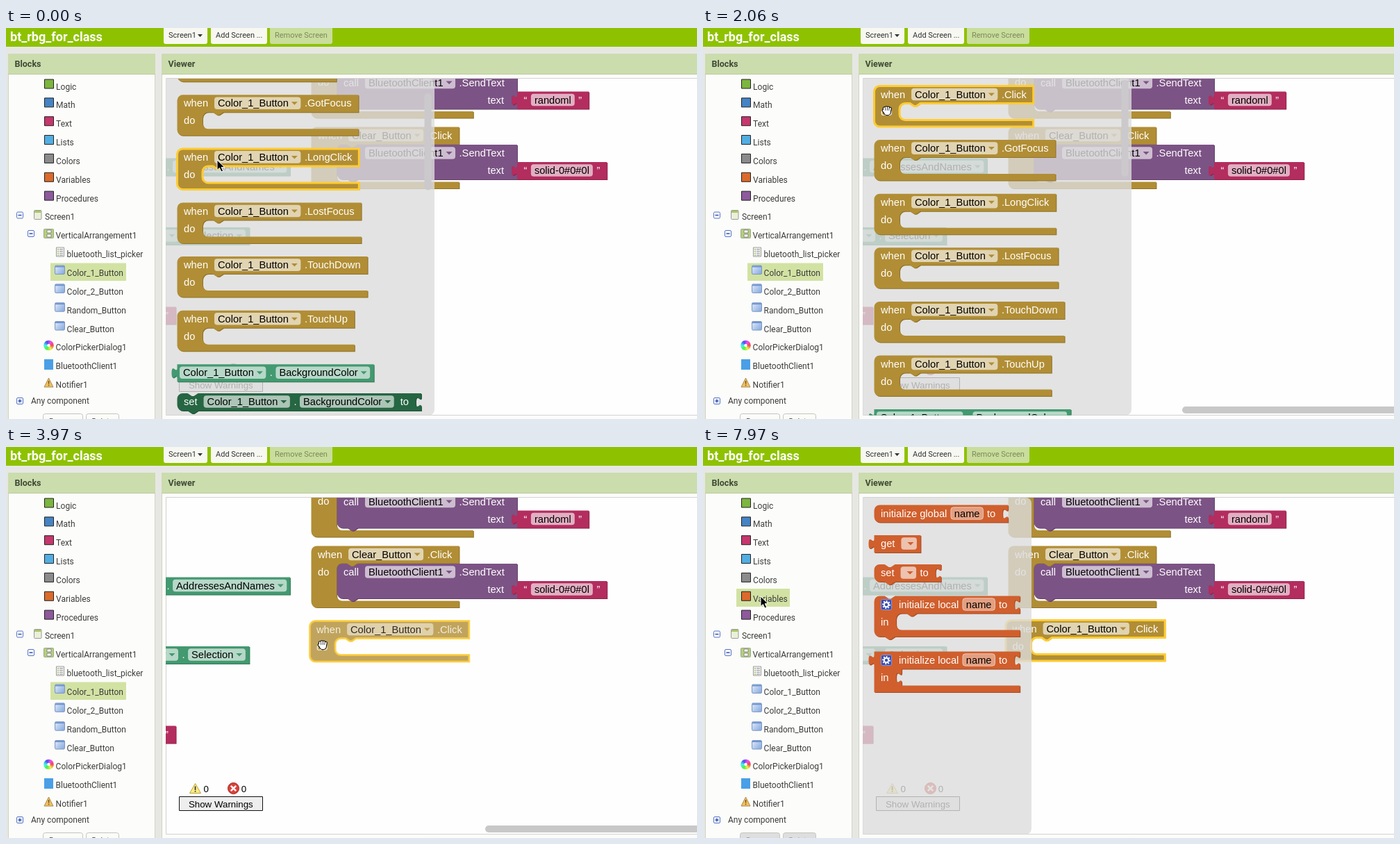
Recreate the animation shown at these times as an HTML page with a canvas. Size 995x563 px, loop 8 s.

```html
<!DOCTYPE html>
<html lang="en">
<head>
<meta charset="utf-8">
<title>Block editor</title>
<style>
html, body { margin: 0; width: 100%; height: 100%; overflow: hidden; background: #e6e7e3; }
canvas { display: block; }
</style>
</head>
<body>
<canvas id="stage" width="995" height="563"></canvas>
<script>
const g = document.getElementById('stage').getContext('2d');
const LOOP = 8000, STEP = 147.5;
const SANS = '"Liberation Sans", Arial, sans-serif', UI = 'Roboto, sans-serif';
const BLOCK_FONT = '14.667px ' + SANS;
const GOLD = '#b18e35', PURPLE = '#7c5385', PINK = '#b32d5e', GREEN = '#439970',
      DARK_GREEN = '#266643', ORANGE = '#d05f2d';
const NOTCH = 'l6 4 3 0 6 -4', NOTCH_BACK = 'l-6 4 -3 0 -6 -4';
const TAB = 'c0 10 -8 -8 -8 7.5 s8 -2.5 8 7.5', TAB_UP = 'c0 -10 -8 8 -8 -7.5 s8 2.5 8 -7.5';

// Motion keys: [step, x, y], linear between them.
const CURSOR = [[0, 304, 190], [4, 279, 139], [10, 279, 139], [14, 265, 119], [16, 265, 119],
  [17, 290, 128], [20, 399, 169], [22, 500, 245], [23, 546, 296], [24, 524, 322], [25, 497, 310],
  [27, 456, 285], [29, 455, 284], [30, 446, 283], [32, 389, 280], [33, 272, 291], [34, 172, 299],
  [35, 172, 299], [36, 161, 325], [38, 140, 385], [39, 134, 376], [41, 131, 342], [42, 134, 315],
  [43, 134, 315], [44, 129, 296], [46, 108, 218], [48, 88, 169], [51, 83, 213], [52, 83, 215]];
const DRAG = [[16, 246.5, 83.5], [17, 264, 90], [20, 352.5, 121.5], [22, 470, 205], [23, 527, 262],
  [24, 505, 288], [25, 475, 274], [27, 437.5, 250.5], [28, 437, 250.5], [29, 436, 249.5]];
const SCROLL = [[5, 64.8, 0], [6, 44, 0], [7, 14, 0], [8, 0, 0]];

function at(keys, k) {
  const i = keys.findIndex(p => p[0] >= k);
  if (i === 0) return keys[0].slice(1);
  if (i < 0) return keys[keys.length - 1].slice(1);
  const a = keys[i - 1], b = keys[i], u = (k - a[0]) / (b[0] - a[0]);
  return [a[1] + (b[1] - a[1]) * u, a[2] + (b[2] - a[2]) * u];
}

function text(s, x, y, font, color, align = 'left') {
  g.font = font;
  g.fillStyle = color;
  g.textAlign = align;
  g.fillText(s, x, y);
}

function box(x, y, w, h, r, fill, stroke) {
  g.beginPath();
  g.roundRect(x, y, w, h, r);
  if (fill) { g.fillStyle = fill; g.fill(); }
  if (stroke) { g.strokeStyle = stroke; g.lineWidth = 1; g.stroke(); }
}

function poly(points, fill, stroke, width = 1) {
  g.beginPath();
  points.forEach(p => g.lineTo(...p));
  g.closePath();
  g.fillStyle = fill;
  g.fill();
  if (stroke) { g.strokeStyle = stroke; g.lineWidth = width; g.stroke(); }
}

function measure(s) {
  g.font = BLOCK_FONT;
  return g.measureText(s).width;
}

function gear(x, y) {
  box(x, y, 15, 15, 2, '#3c4fb0', '#8a96dc');
  g.strokeStyle = '#fff';
  g.lineWidth = 2;
  g.beginPath();
  g.arc(x + 7.5, y + 7.5, 3.2, 0, 7);
  g.stroke();
  g.setLineDash([1.8, 1.97]);
  g.beginPath();
  g.arc(x + 7.5, y + 7.5, 5, 0, 7);
  g.stroke();
  g.setLineDash([]);
}

// Items: string = label, number = extra gap, [text, dropdown] = field, null = gear. Returns the width.
function row(items, x, y, color, draw) {
  let cx = x + 9.5, end = 0;
  for (const it of items) {
    if (typeof it === 'number') { cx += it; continue; }
    if (it === null) {
      if (draw) gear(cx + .5, y + 5);
      cx += 26;
    } else if (typeof it === 'string') {
      if (draw) text(it, cx, y + 17, BLOCK_FONT, '#fff');
      cx += measure(it) + 5.5;
      end = 4.5;
    } else {
      const [s, drop] = it, w = measure(s) + (drop ? 22.5 : 10);
      if (draw) {
        const soft = !drop && color === ORANGE;
        box(cx, y + 3.2, w, 17.6, 4, soft ? 'rgba(255,255,255,.4)' : 'rgba(255,255,255,.62)',
          soft && 'rgba(255,255,255,.5)');
        text(s, cx + 5, y + 17, BLOCK_FONT, '#000');
        const r = cx + w - 4.5;
        if (drop) poly([[r - 9, y + 10], [r, y + 10], [r - 4.5, y + 14.5]], color);
      }
      cx += w + 5.5;
      end = 0;
    }
  }
  return cx + end - x;
}

function block(o) {
  const { x, y, color, items } = o, h = o.h || 25;
  const w = o.w || row(items, x, y, color) + (o.socket !== undefined ? 8 : 0);
  const m = o.label && x + 20.2 + measure(o.label), mh = o.mouth || 24;
  const right = x + w;
  let bottom = y + h, d = o.out ? `M${x} ${y}` : `M${x} ${y + 8}a8 8 0 0 1 8 -8`;
  if (o.prev) d += `H${x + 15}${NOTCH}`;
  d += `H${right}`;
  if (o.socket !== undefined) d += `V${y + 5 + 25 * o.socket}${TAB}`;
  d += `V${bottom}`;
  if (o.label) {
    d += o.value ? `H${m + 8}v5${TAB}V${bottom + mh}`
      : `H${m + 30}${NOTCH_BACK}h-7a8 8 0 0 0 -8 8v${mh - 16}a8 8 0 0 0 8 8`;
    bottom += mh + 9.5;
    d += `H${right}V${bottom}`;
  }
  if (o.next) d += `H${x + 30}${NOTCH_BACK}`;
  d += o.out ? `H${x}V${y + 20}${TAB_UP}z` : `H${x + 8}a8 8 0 0 1 -8 -8z`;
  const path = new Path2D(d);
  g.save();
  if (o.dragging) g.globalAlpha = .8;
  else {
    g.translate(1, 1);
    g.fillStyle = color;
    g.fill(path);
    g.fillStyle = 'rgba(0,0,0,.2)';
    g.fill(path);
    g.translate(-1, -1);
  }
  g.fillStyle = color;
  g.fill(path);
  if (o.selected) {
    g.strokeStyle = '#fc3';
    g.lineWidth = 3;
    g.stroke(path);
  }
  row(items, x, y, color, true);
  if (o.label) text(o.label, x + 9.5, y + 42, BLOCK_FONT, '#fff');
  g.restore();
}

function eventBlock(x, y, name, event, more) {
  block({ x, y, color: GOLD, items: ['when', 3.5, [name, 1], '.' + event], label: 'do', ...more });
}

function sendText(x, y, name, value) {
  eventBlock(x, y, name, 'Click', { mouth: 54 });
  block({ x: x + 37, y: y + 25.5, color: PURPLE, w: 259.5, h: 50, prev: 1, next: 1, socket: 1,
    items: ['call', 3.5, ['BluetoothClient1', 1], '.SendText'] });
  text('text', x + 277.5, y + 67.5, BLOCK_FONT, '#fff', 'right');
  block({ x: x + 296.5, y: y + 50.5, color: PINK, out: 1, items: ['“', [value], '”'] });
}

function workspace(k) {
  sendText(439.5, 41, 'Random_Button', 'randoml');
  sendText(439.5, 142.5, 'Clear_Button', 'solid-0#0#0l');
  const picker = 'bluetooth_list_picker', start = 227 - measure(picker);
  block({ x: start - 149, y: 187.5, color: GREEN, out: 1, w: 558 - start,
    items: [-6, [picker, 1], '.'] });
  row([-1, '.', -1, ['AddressesAndNames', 1]], 223, 187.5, GREEN, true);
  block({ x: start - 5, y: 287, color: GREEN, out: 1,
    items: [-6, [picker, 1], '.', -1, ['Selection', 1]] });
  block({ x: 180, y: 401.5, color: PINK, out: 1, w: 64.5, items: [39.5, '”'] });

  poly([[272.5, 484.5], [280.5, 498.5], [264.5, 498.5]], '#ffec80', '#b9a23c');
  g.fillStyle = '#333';
  g.fillRect(271.7, 488.5, 1.7, 5.5);
  g.fillRect(271.7, 495, 1.7, 1.7);
  text('0', 284.5, 497, '13.33px ' + SANS, '#000');
  g.beginPath();
  g.arc(327.5, 491.5, 8, 0, 7);
  g.fillStyle = '#d8423a';
  g.fill();
  g.strokeStyle = '#a52a24';
  g.lineWidth = 1;
  g.stroke();
  g.strokeStyle = '#fff';
  g.lineWidth = 2.4;
  g.beginPath();
  for (const s of [-1, 1]) { g.moveTo(323.8, 491.5 - 3.7 * s); g.lineTo(331.2, 491.5 + 3.7 * s); }
  g.stroke();
  text('0', 338.8, 497, '13.33px ' + SANS, '#000');
  box(249.5, 503.5, 120, 20, 0, '#eee', '#111');
  text('Show Warnings', 309.3, 518.5, '13.33px ' + SANS, '#000', 'center');

  if (k >= 17) {
    const [x, y] = at(DRAG, k);
    eventBlock(x, y, 'Color_1_Button', 'Click', { selected: 1, dragging: k < 29 });
  }
  if (k >= 14 && k < 52) box(690, 545, 320, 10, 5, '#c8c8c8');
}

function flyout(width) {
  box(222, 73, width + 8, 484.5, 8, 'rgba(221,221,221,.8)');
}

function buttonFlyout(k) {
  const scroll = at(SCROLL, k)[0], top = 83.5 - scroll, x = 246.5, name = ['Color_1_Button', 1];
  const hot = k < 3 ? 2 : k < 11 ? 1 : 0;
  flyout(387);
  ['Click', 'GotFocus', 'LongClick', 'LostFocus', 'TouchDown', 'TouchUp'].forEach((e, i) =>
    eventBlock(x, top + 77.6 * i, name[0], e, { selected: i === hot }));
  block({ x, y: top + 465.6, color: GREEN, out: 1,
    items: [-6, name, '.', -1, ['BackgroundColor', 1]] });
  block({ x, y: top + 507.3, color: DARK_GREEN, prev: 1, next: 1, socket: 0,
    items: ['set', 3.5, name, '.', -1, ['BackgroundColor', 1], 3.5, 'to'] });
  box(602.5, 75 + scroll * .3, 10, 139, 5, '#cbc9cc');
}

function variableFlyout() {
  const add = (y, items, more) => block({ x: 246.5, y, color: ORANGE, items, ...more });
  const local = [null, 'initialize local', ['name'], 'to'];
  flyout(243);
  add(83.5, ['initialize global', ['name'], 'to'], { socket: 0 });
  add(127, ['get', 3.5, ['', 1]], { out: 1 });
  add(169, ['set', 3.5, ['', 1], 'to'], { prev: 1, next: 1, socket: 0 });
  add(214.5, local, { prev: 1, next: 1, socket: 0, label: 'in' });
  add(294.5, local, { out: 1, socket: 0, label: 'in', value: 1 });
}

function toggle(x, y, plus) {
  box(x + .5, y - 4.5, 9, 9, 1.5, '#fff', '#5573c4');
  g.fillStyle = '#2f4fb0';
  g.fillRect(x + 2.5, y - .7, 5, 1.5);
  if (plus) g.fillRect(x + 4.2, y - 2.5, 1.5, 5);
}

function sidebar(k) {
  const label = (s, x, i) => text(s, x + .6, 88.5 + 26.85 * i, '12px ' + UI, '#3c3c3c');
  const variables = k >= 52;
  g.fillStyle = '#d2e2a3';
  if (variables) g.fillRect(48, 204, 77, 26);
  else g.fillRect(64, 338.5, 109, 25.5);

  [['Logic', '#7cb53f'], ['Math', '#4583c4'], ['Text', '#c5376d'], ['Lists', '#52aee2'],
   ['Colors', '#8b8b8b'], ['Variables', '#db6a2c'], ['Procedures', '#8d5a9b']].forEach(([s, c], i) => {
    box(55.5, 74 + 26.85 * i, 13, 13, 0, c, '#222');
    label(s, 71.5, i);
  });

  toggle(15, 269.5);
  box(40.5, 262.5, 10.5, 13, 1, '#e9efd9', '#999');
  g.fillStyle = '#a9c66a';
  g.fillRect(41, 263, 9.5, 3);
  label('Screen1', 55.3, 7);
  toggle(31, 296);
  box(54.5, 289.5, 14, 13, 1, '#b5d07a', '#9aa98a');
  box(59, 291, 6, 4, 0, '#fff', '#888');
  box(59, 297, 6, 4, 0, '#fff', '#888');
  label('VerticalArrangement1', 71, 8);
  box(72.5, 316, 11, 13, 0, '#fafafa', '#999');
  for (let i = 0; i < 4; i++) {
    g.fillStyle = '#8fae5c';
    g.fillRect(74, 318 + 2.8 * i, 2, 1.3);
    g.fillStyle = '#999';
    g.fillRect(77, 318 + 2.8 * i, 5, 1.2);
  }
  label('bluetooth_list_picker', 87, 9);
  ['Color_1_Button', 'Color_2_Button', 'Random_Button', 'Clear_Button'].forEach((s, i) => {
    const y = 342 + 26.85 * i, fill = g.createLinearGradient(70, y, 84, y + 12);
    fill.addColorStop(0, '#e4eefb');
    fill.addColorStop(1, '#86a9de');
    box(70.5, y, 14, 12.5, 1.5, fill, '#7d97c4');
    g.fillStyle = '#6f93d2';
    g.fillRect(71, y + .5, 13, 2);
    label(s, 87, 10 + i);
  });
  const wheel = g.createConicGradient(0, 61.5, 457);
  for (let i = 0; i <= 6; i++) wheel.addColorStop(i / 6, `hsl(${i * 60} 85% 62%)`);
  g.beginPath();
  g.arc(61.5, 457, 7.3, 0, 7);
  g.fillStyle = wheel;
  g.fill();
  g.beginPath();
  g.arc(61.5, 457, 2.2, 0, 7);
  g.fillStyle = '#fff';
  g.fill();
  label('ColorPickerDialog1', 71, 14);
  g.fillStyle = '#4a9fe6';
  g.fillRect(55, 477, 13, 15);
  label('BluetoothClient1', 71, 15);
  poly([[61.5, 504], [68, 517], [55, 517]], '#f3c05c', '#a58a5c');
  g.fillStyle = '#6b5020';
  g.fillRect(60.8, 508, 1.5, 4.5);
  g.fillRect(60.8, 513.7, 1.5, 1.5);
  label('Notifier1', 71, 16);
  toggle(15, 537, true);
  text('Any component', 36, 541, '12px ' + UI, '#3c3c3c');

  const fill = variables ? '#dedede' : '#fbfbf8', ink = variables ? '#999' : '#444';
  box(53.5, 555.5, 57, 22, 3, fill, '#c4c4c0');
  box(115.5, 555.5, 47, 22, 3, fill, '#c4c4c0');
  text('Rename', 82, 570, '11px ' + UI, ink, 'center');
  text('Delete', 139, 570, '11px ' + UI, ink, 'center');
}

function chrome() {
  g.fillStyle = '#e6e7e3';
  g.fillRect(0, 0, 995, 563);
  g.fillStyle = '#8ec200';
  g.fillRect(0, 0, 995, 27);
  text('bt_rbg_for_class', 6, 19, 'bold 18px ' + UI, '#fff');
  [[227, 63, 'Screen1', '#f7f8f1'], [295, 81, 'Add Screen ...', '#f7f8f1'],
   [380, 90, 'Remove Screen', '#c9dd9c']].forEach(([x, w, s, fill], i) => {
    box(x, -5, w, 28, 3, fill);
    text(s, x + 7, 14, '11px ' + UI, i < 2 ? '#333' : '#7b8a5c');
  });
  poly([[276, 9], [283, 9], [279.5, 13]], '#333');
  for (const [x, w, s] of [[3, 211, 'Blocks'], [224, 780, 'Viewer']]) {
    box(x + .5, 37.5, w, 540, 0, '#fcfdfa', '#cfd3c8');
    g.fillStyle = '#cbdcad';
    g.fillRect(x, 37, w + 1, 29.5);
    g.fillStyle = '#bccb9f';
    g.fillRect(x, 66, w + 1, 1);
    text(s, x + 9.5, 56, 'bold 12.5px ' + UI, '#3f4a35');
  }
  box(230.5, 72.5, 780, 485, 0, '#fefefe', '#d2d2d2');
}

function arrow(x, y) {
  poly([[0, 0], [0, 14.5], [3.4, 11.5], [6, 17], [8.6, 15.8], [6.2, 10.6], [10.5, 10.3]]
    .map(p => [x + p[0], y + p[1]]), '#000', '#fff', 1);
}

function hand(x, y, closed) {
  const tips = closed ? [[-4, -3.5], [-1.3, -4.5], [1.8, -4.3], [4.5, -3], [-5, 0]]
    : [[-4, -4.5], [-1.3, -6.3], [2, -5.8], [5, -3.5], [-6, 1]];
  g.lineCap = 'round';
  for (const [color, grow] of [['#000', 2], ['#fff', 0]]) {
    g.strokeStyle = g.fillStyle = color;
    g.lineWidth = 2.6 + grow;
    g.beginPath();
    tips.forEach(([a, b], i) => {
      g.moveTo(x + a, y + b);
      g.lineTo(x + (i < 4 ? a * .7 : -2), y + 3);
    });
    g.stroke();
    g.beginPath();
    g.ellipse(x + .4, y + 2.5, 4.3 + grow / 2, 3.7 + grow / 2, 0, 0, 7);
    g.fill();
  }
  g.strokeStyle = '#000';
  g.lineWidth = .7;
  g.beginPath();
  for (const dx of [-2.6, .3, 3]) { g.moveTo(x + dx, y - 3.5); g.lineTo(x + dx * .9, y - .5); }
  g.stroke();
  g.lineCap = 'butt';
}

function frame(now) {
  const k = Math.floor((now % LOOP + 15) / STEP);
  chrome();
  sidebar(k);
  g.save();
  g.beginPath();
  g.rect(230, 73, 765, 484.5);
  g.clip();
  workspace(k);
  if (k < 17) buttonFlyout(k);
  if (k >= 52) variableFlyout();
  g.restore();
  const [x, y] = at(CURSOR, k);
  if (k >= 3 && k < 29) hand(x, y, k >= 14);
  else arrow(x, y);
  requestAnimationFrame(frame);
}
requestAnimationFrame(frame);
</script>
</body>
</html>
```
